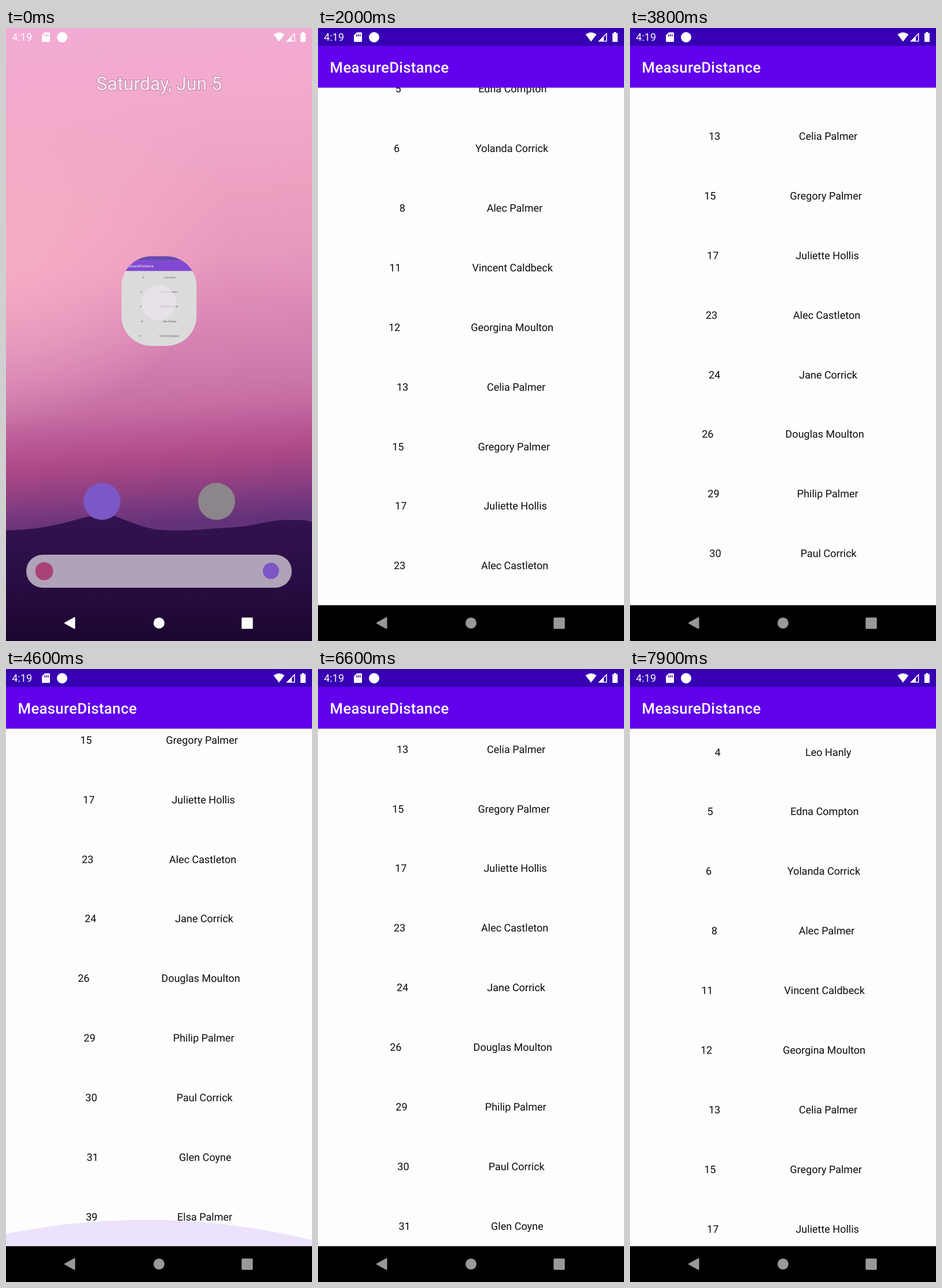
Write an HTML page that moves like this. It is 529 px wide and 1058 px high and loops after 8 s.

```html
<!DOCTYPE html>
<html lang="en">
<head>
<meta charset="utf-8">
<title>MeasureDistance</title>
<style>
  html, body { margin: 0; width: 100%; height: 100%; overflow: hidden; background: #000; }
  svg { display: block; width: 100vw; height: 100vh; font-family: Roboto, sans-serif; text-rendering: geometricPrecision; }
  #rows { font-size: 18px; fill: #0c0c0c; }
</style>
</head>
<body>
<svg viewBox="0 0 529 1058" xmlns="http://www.w3.org/2000/svg">
  <defs>
    <linearGradient id="sky" gradientUnits="userSpaceOnUse" x1="0" y1="0" x2="60" y2="870">
      <stop offset="0" stop-color="#f2abd3"/>
      <stop offset=".15" stop-color="#f2aacd"/>
      <stop offset=".36" stop-color="#eca0c0"/>
      <stop offset=".48" stop-color="#e898bd"/>
      <stop offset=".6" stop-color="#da88b5"/>
      <stop offset=".7" stop-color="#d07bae"/>
      <stop offset=".77" stop-color="#c66ea4"/>
      <stop offset=".83" stop-color="#b85792"/>
      <stop offset=".88" stop-color="#aa4886"/>
      <stop offset=".93" stop-color="#8f3f82"/>
      <stop offset="1" stop-color="#63327a"/>
    </linearGradient>
    <radialGradient id="haze" gradientUnits="userSpaceOnUse" cx="0" cy="0" r="1" gradientTransform="translate(0 400) rotate(-18) scale(400 290)">
      <stop offset="0" stop-color="#fab3c8" stop-opacity=".75"/>
      <stop offset=".5" stop-color="#fab3c8" stop-opacity=".45"/>
      <stop offset="1" stop-color="#fab3c8" stop-opacity="0"/>
    </radialGradient>
    <linearGradient id="hill" x2="0" y2="1">
      <stop offset="0" stop-color="#33134f"/>
      <stop offset=".5" stop-color="#2a0d45"/>
      <stop offset="1" stop-color="#1b062f"/>
    </linearGradient>
    <linearGradient id="shade" x2="0" y2="1">
      <stop offset="0" stop-opacity=".1"/>
      <stop offset="1" stop-opacity="0"/>
    </linearGradient>
    <clipPath id="window"><rect id="frame"/></clipPath>
  </defs>

  <g id="home">
    <rect width="529" height="1058" fill="url(#sky)"/>
    <rect width="529" height="1058" fill="url(#haze)"/>
    <path d="M0 867C35 867 70 862 105 853S150 840 172 840S225 862 265 866S350 864 390 862S450 849 490 849S520 851 529 852V1058H0Z" fill="url(#hill)"/>
    <g id="dock">
      <text x="264.7" y="107" font-size="32.1" text-anchor="middle" fill="#faeef5" stroke="#80596f" stroke-opacity=".5" stroke-width="2" paint-order="stroke">Saturday, Jun 5</text>
      <circle cx="166" cy="817" r="32" fill="#7b58c6"/>
      <circle cx="364" cy="817" r="32" fill="#8d858c"/>
      <rect x="35" y="909" width="459" height="57" rx="28.5" fill="#b0a3b9"/>
      <circle cx="66" cy="937.5" r="15.5" fill="#ab4179"/>
      <circle cx="458" cy="937" r="14" fill="#7c56c4"/>
    </g>
  </g>

  <g clip-path="url(#window)">
    <g id="app">
      <rect width="529" height="1058" fill="#fdfdfe"/>
      <g id="rows"></g>
      <path id="glow" fill="#6200ee"/>
      <rect y="102.9" width="529" height="3" fill="url(#shade)"/>
      <rect y="30" width="529" height="72.9" fill="#6200ee"/>
      <rect width="529" height="30.9" fill="#3700b3"/>
      <text x="20.6" y="77" font-size="25.7" font-weight="500" letter-spacing=".32" fill="#fff">MeasureDistance</text>
      <rect y="996.2" width="529" height="62"/>
    </g>
    <g id="splash">
      <rect width="529" height="1058" fill="#ababab" opacity=".42"/>
      <circle id="badge" fill="#f3e6f3" opacity=".6"/>
    </g>
  </g>

  <g fill="#fff">
    <text x="10.3" y="22" font-size="18">4:19</text>
    <path fill-rule="evenodd" d="M67 7.5H74.5Q76 7.5 76 9V22.5Q76 24 74.5 24H63.5Q62 24 62 22.5V12.5ZM66 11V14.5H67.6V11ZM69 11V14.5H70.6V11ZM72 11V14.5H73.6V11Z"/>
    <circle cx="97" cy="16" r="9"/>
    <path d="M462.5 11Q472 4 481.5 11L472 23.5Z"/>
    <path d="M484 23.5L499.5 8V23.5ZM494 15.7V22H498V11.7Z" fill-rule="evenodd"/>
    <path d="M511.5 7H515.5V9H518V24H509V9H511.5Z"/>
  </g>

  <g id="nav" stroke-linejoin="round">
    <path d="M102 1027L118.5 1018V1036Z" stroke-width="2"/>
    <circle cx="264.5" cy="1027" r="9.5" stroke="none"/>
    <rect x="407.3" y="1017.5" width="19.4" height="19.4" rx="1.5" stroke="none"/>
  </g>
</svg>

<script>
const LOOP = 8000, STEP = 100, WIDTH = 529, HEIGHT = 1058;
const ROW_GAP = 102.87, FIRST_BASELINE = 153.3, SCROLL_END = 744.6;

const people = [
  [4, 'Leo Hanly'], [5, 'Edna Compton'], [6, 'Yolanda Corrick'], [8, 'Alec Palmer'],
  [11, 'Vincent Caldbeck'], [12, 'Georgina Moulton'], [13, 'Celia Palmer'],
  [15, 'Gregory Palmer'], [17, 'Juliette Hollis'], [23, 'Alec Castleton'],
  [24, 'Jane Corrick'], [26, 'Douglas Moulton'], [29, 'Philip Palmer'],
  [30, 'Paul Corrick'], [31, 'Glen Coyne'], [39, 'Elsa Palmer']
];

// Each fling: start, end, scroll position reached
const flings = [
  [1100, 2200, 149.8], [2300, 3200, 577.4], [4000, 4300, SCROLL_END],
  [6400, 7300, 443.9], [7300, 8000, -5.5]
];
const pulls = [4100, 4600, 5100];
const pullHeights = [45, 73, 50, 23];

const $ = id => document.getElementById(id);
const ramp = (t, from, to) => Math.min(1, Math.max(0, (t - from) / (to - from)));
const easeOut = (p, power) => 1 - (1 - p) ** power;
const mix = (a, b, p) => a + (b - a) * p;

function set(node, attrs) {
  for (const key in attrs) node.setAttribute(key, attrs[key]);
}

function addText(content, y) {
  const node = document.createElementNS('http://www.w3.org/2000/svg', 'text');
  node.textContent = content;
  node.setAttribute('y', y);
  $('rows').append(node);
  return node;
}

// Number and name share the free width in three equal gaps
function buildRows() {
  people.forEach(([number, name], i) => {
    const y = FIRST_BASELINE + i * ROW_GAP;
    const left = addText(number, y), right = addText(name, y);
    const leftWidth = left.getComputedTextLength();
    const gap = (WIDTH - leftWidth - right.getComputedTextLength()) / 3;
    left.setAttribute('x', gap);
    right.setAttribute('x', gap * 2 + leftWidth);
  });
}

function scrollAt(t) {
  let pos = 0;
  for (const [from, to, target] of flings) {
    pos = mix(pos, target, easeOut(ramp(t, from, to), 2));
  }
  return pos;
}

function glowHeight(t) {
  if (t < 4300 || t >= 5700) return 0;
  const start = pulls.filter(p => p <= t).pop();
  return pullHeights[Math.min(3, Math.floor((t - start) / STEP))];
}

function drawLaunch(t) {
  const p = easeOut(ramp(t, 0, 500), 3);
  const x = mix(199.5, 0, p), y = mix(394, 0, p);
  const width = mix(130, WIDTH, p), height = mix(154.5, HEIGHT, p);
  set($('frame'), { x, y, width, height, rx: mix(52, 0, p) });
  set($('app'), { transform: `translate(${x} ${y}) scale(${width / WIDTH})` });
  set($('splash'), { opacity: 1 - ramp(t, 0, 250) });
  set($('badge'), { cx: x + width / 2, cy: y + height / 2 + 3, r: width * 0.23 });
  set($('dock'), { opacity: 1 - ramp(t, 0, 250) });
}

function drawGlow(t) {
  const h = glowHeight(t), top = 996 - h;
  const edge = x => top + 0.72 * h * ((x - 240) / 280) ** 2;
  const pull = 2 * (top - (edge(0) + edge(WIDTH)) / 4);
  set($('glow'), {
    d: `M0 996V${edge(0)}Q${WIDTH / 2} ${pull} ${WIDTH} ${edge(WIDTH)}V996Z`,
    opacity: h / 73 * 0.17
  });
}

function draw(t) {
  drawLaunch(t);
  drawGlow(t);
  set($('rows'), { transform: `translate(0 ${-scrollAt(t)})` });
  const level = Math.round(mix(255, 153, ramp(t, 1400, 1700)));
  const color = `rgb(${level},${level},${level})`;
  set($('nav'), { fill: color, stroke: color });
}

buildRows();
const began = performance.now();
function tick() {
  const t = (performance.now() - began) % LOOP;
  draw(Math.floor(t / STEP) * STEP);
  requestAnimationFrame(tick);
}
tick();
</script>
</body>
</html>
```
